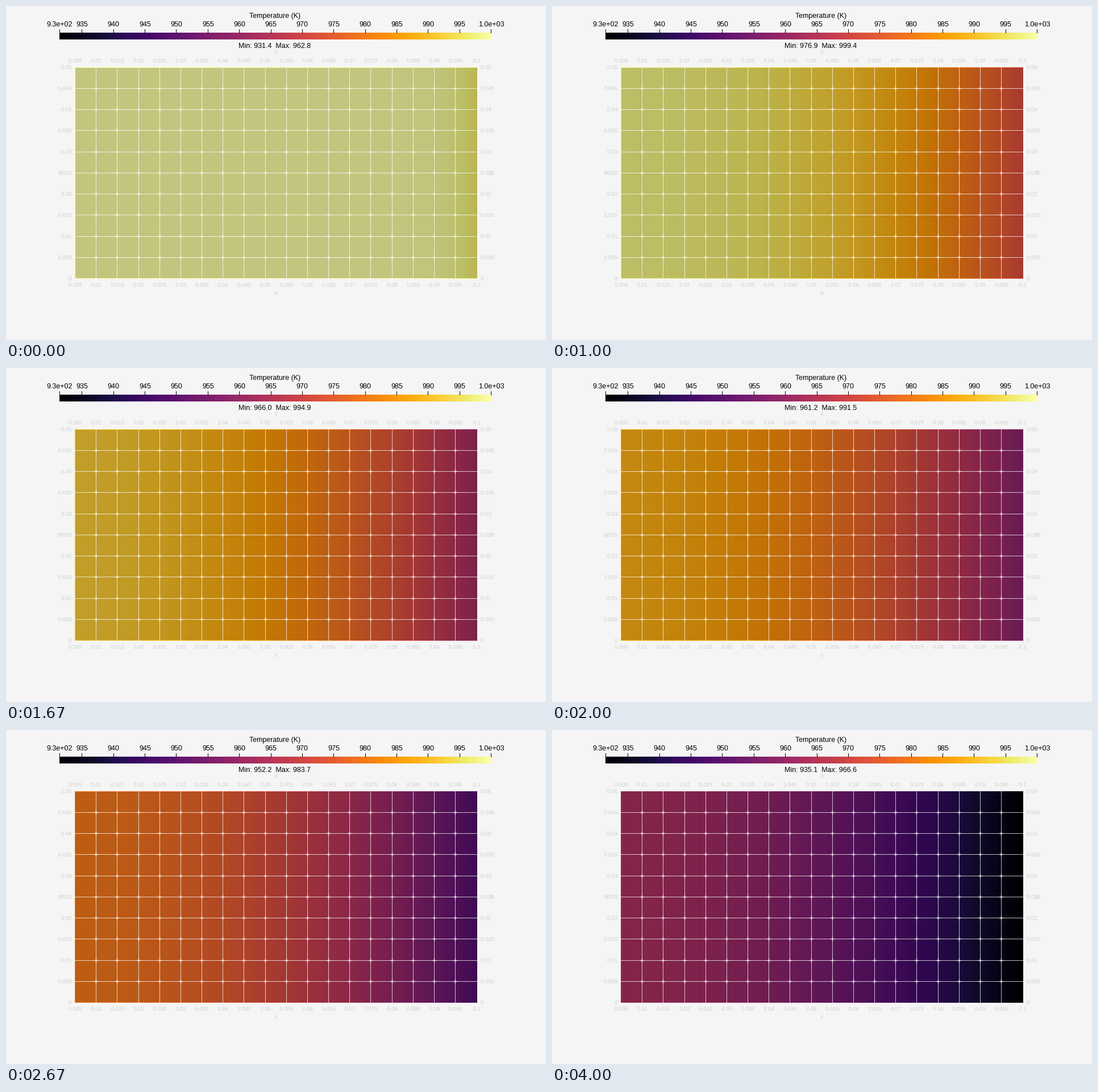
Recreate the animation shown at these times as a matplotlib script. Size 950x589 px, loop 4.33 s.

```python
import numpy as np
import matplotlib
import matplotlib.pyplot as plt
from matplotlib.animation import FuncAnimation
from matplotlib.collections import LineCollection, PolyCollection
from matplotlib.patches import PathPatch
from matplotlib.path import Path
from matplotlib.textpath import TextPath

W, H, DPI = 950, 589, 64
PT = 72 / DPI
STEPS = 13                               # saved steps of the simulation
TICKS, TICK_MS = 433, 10
BG = "#f5f5f5"
X0, X1, Y0, Y1 = 121, 829, 108, 481      # heated plate, in pixels
BAR_L, BAR_R = 94, 853.5
T_MIN, T_MAX = 931.4, 1000.0
SHADE = 0.775

# coldest and hottest temperature at each saved step
LOW = [995.8, 983.9, 976.9, 971.2, 966.0, 961.2, 956.6,
       952.2, 947.8, 943.5, 939.3, 935.1, 931.4]
HIGH = [1000.0, 1000.0, 999.4, 997.6, 994.9, 991.5, 987.7,
        983.7, 979.5, 975.2, 970.9, 966.6, 962.8]

plt.rcParams["font.family"] = "Liberation Sans"
inferno = matplotlib.colormaps["inferno"].resampled(1024)


def radial_profiles(n=191, diffusivity=0.0335, dt=1 / 16):
    """Cooling of a hollow cylinder through its outer wall, scaled to 0..1."""
    r = np.linspace(0.05, 1, n)
    dr = r[1] - r[0]
    face = (r[1:] + r[:-1]) / 2
    vol = r * dr
    vol[[0, -1]] /= 2
    m = np.eye(n)
    for i, f in enumerate(face):
        c = diffusivity * dt * f / dr
        for a, b in ((i, i + 1), (i + 1, i)):
            m[a, a] += c / vol[a]
            m[a, b] -= c / vol[a]
    step = np.linalg.inv(m)
    temp = np.full(n, 1000.0)
    out, done = [], 0
    for k in range(STEPS):
        while done < max(2, 16 * k - 2):
            src = temp.copy()
            src[-1] -= 2.72 * dt * (temp[-1] / 1000) ** 4 / vol[-1]
            temp = step @ src
            done += 1
        out.append((temp.max() - temp) / (temp.max() - temp.min()))
    return r, out


radius, shapes = radial_profiles()
columns = np.linspace(0.05, 1, X1 - X0)


def plate(k):
    drop = np.interp(columns, radius, shapes[k])
    temp = HIGH[k] - (HIGH[k] - LOW[k]) * drop
    rgb = inferno((temp - T_MIN) / (T_MAX - T_MIN))[:, :3] * 255
    img = np.tile(rgb * SHADE, (Y1 - Y0, 1, 1))
    img[[0, -1]] = rgb
    img[:, 0] = rgb[0]
    return img.round().astype(np.uint8)


plates = [plate(k) for k in range(STEPS)]

fig = plt.figure(figsize=(W / DPI, H / DPI), dpi=DPI, facecolor=BG)
ax = fig.add_axes([0, 0, 1, 1])


def label(x, y, s):
    return ax.text(x, y, s, fontsize=12.55 * PT, ha="center", va="baseline",
                   zorder=5)


def strokes(segments, color):
    ax.add_collection(LineCollection(segments, colors=color, linewidths=PT,
                                     snap=False, capstyle="butt"))


# colour legend
ramp = inferno(np.linspace(0, 1, 760))[None, :, :3]
ax.imshow(ramp, extent=(94, 854, 59, 47), aspect="auto", interpolation="nearest")
label(473, 21, "Temperature (K)")
ticks = [(BAR_L, "9.3e+02"), (BAR_R, "1.0e+03")]
for v in range(935, 1000, 5):
    ticks.append((BAR_L + (v - T_MIN) / (T_MAX - T_MIN) * (BAR_R - BAR_L), str(v)))
for x, s in ticks:
    label(x, 36, s)
strokes([[(int(x) + 0.5, 41), (int(x) + 0.5, 48)] for x, _ in ticks], "black")
stats = label(472.5, 74.5, "")

# plate, grid and glints where grid lines cross
field = ax.imshow(plates[0], extent=(X0, X1, Y1, Y0), aspect="auto",
                  interpolation="nearest")
xs = [121.6 + 37.17 * i for i in range(20)]
ys = [108 + 37.25 * i for i in range(11)]
gx = [int(x) + 0.5 for x in xs[1:-1]]
gy = [int(y) + 0.5 for y in ys[1:-1]]
strokes([[(x, Y0), (x, Y1)] for x in gx] + [[(X0, y), (X1, y)] for y in gy],
        (1, 1, 1, 0.72))
glints = []
for x in gx:
    for y in gy:
        for a, b in ((6.5, 1.2), (1.2, 6.5)):
            glints.append([(x - a, y), (x, y - b), (x + a, y), (x, y + b)])
ax.add_collection(PolyCollection(glints, facecolors=(1, 1, 1, 0.5),
                                 edgecolors="none"))

# axis numbers, gathered into one shape so that each redraw stays quick
outlines = []


def small(x, y, s, shift=0.5):
    path = TextPath((0, 0), s, size=9.5)
    x -= shift * path.get_extents().x1
    outlines.append(Path(path.vertices * [1, -1] + [x, y], path.codes))


for i, x in enumerate(xs):
    s = f"{0.005 * (i + 1):.3g}"
    small(x, 99.5, s)
    small(x, 495, s)
for i, y in enumerate(ys):
    s = f"{0.005 * (10 - i):.3g}"
    small(115, y + 3.2, s, 1)
    small(835, y + 3.2, s, 0)
for x, y, s in ((475, 84, "X"), (475, 509.5, "X"), (97, 297.5, "Y"), (853, 297.5, "Y")):
    small(x, y, s)
ax.add_patch(PathPatch(Path.make_compound_path(*outlines), facecolor="#cfcfcf",
                       edgecolor="none", snap=False))

ax.set_xlim(0, W)
ax.set_ylim(H, 0)
ax.axis("off")


def update(tick):
    k = (3 * tick + 1) // 100            # a new picture every third of a second
    field.set_data(plates[k])
    # the readout trails the picture by one step
    stats.set_text(f"Min: {LOW[k - 1]:.1f}  Max: {HIGH[k - 1]:.1f}")
    return field, stats


anim = FuncAnimation(fig, update, frames=TICKS, interval=TICK_MS,
                     repeat=True, repeat_delay=0, cache_frame_data=False)
plt.show()
```
